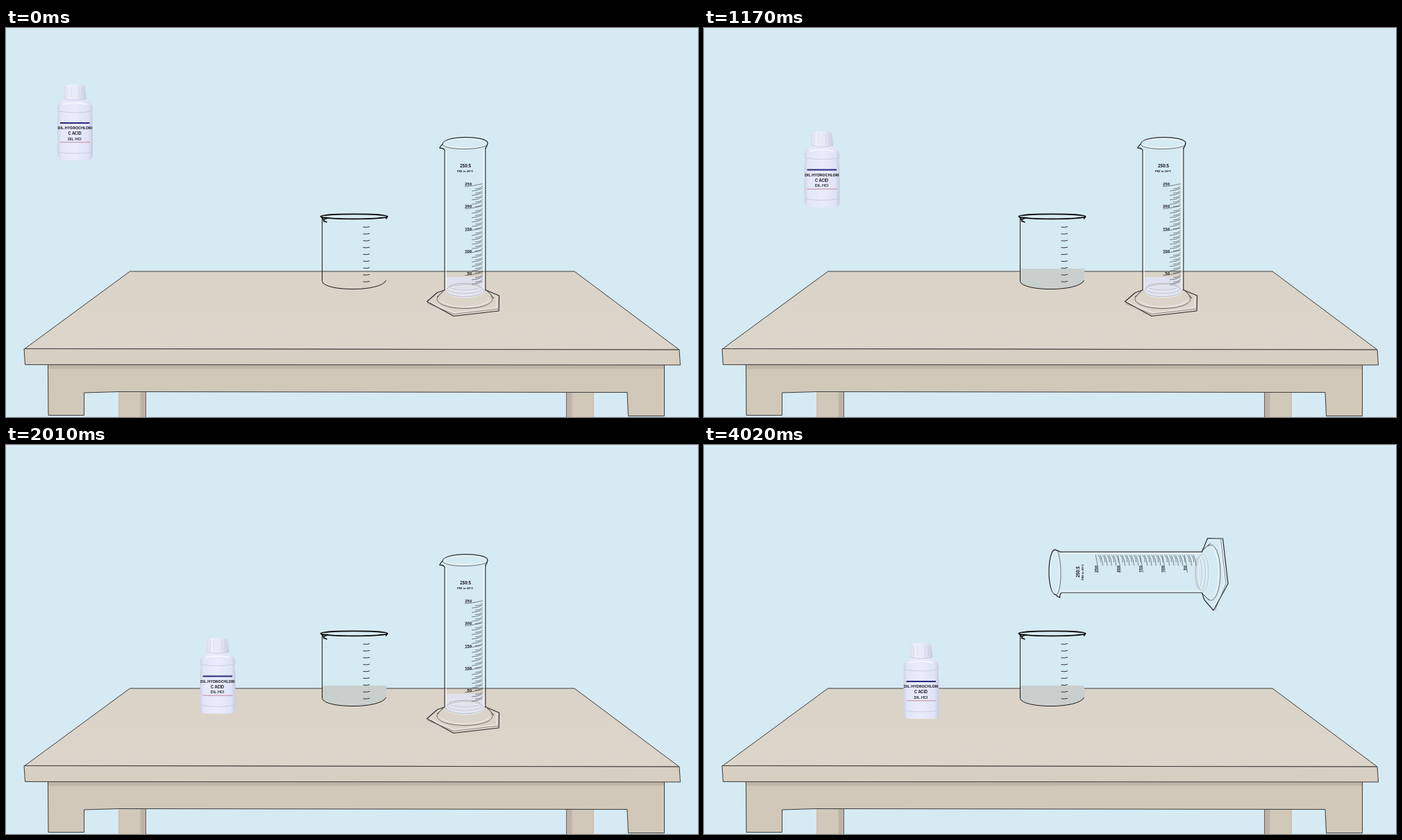
An HTML page with a canvas for the animation above (6330 ms loop, 997 by 561 pixels).

```html
<!DOCTYPE html>
<html lang="en">
<head>
<meta charset="utf-8">
<title>Acid and measuring cylinder</title>
<style>
html, body { margin: 0; width: 100%; height: 100%; overflow: hidden; background: #d6eaf3; }
canvas { display: block; width: 100%; height: 100%; }
</style>
</head>
<body>
<canvas id="stage" width="997" height="561"></canvas>
<script>
const ctx = document.getElementById('stage').getContext('2d');
const LOOP = 6330, STEP = 30;
const INK = '#3c3c3c';

const clamp = v => Math.max(0, Math.min(1, v));

function paint(path, fill, stroke, width = 1) {
  const p = typeof path === 'string' ? new Path2D(path) : path;
  if (fill) { ctx.fillStyle = fill; ctx.fill(p); }
  if (stroke) { ctx.strokeStyle = stroke; ctx.lineWidth = width; ctx.stroke(p); }
}

function oval(x, y, rx, ry, stroke, width, from = 0, to = 2 * Math.PI) {
  const p = new Path2D();
  p.ellipse(x, y, rx, ry, 0, from, to);
  paint(p, null, stroke, width);
}

function label(text, x, y, font, align = 'center', color = '#1c1c22') {
  ctx.font = font;
  ctx.textAlign = align;
  ctx.fillStyle = color;
  ctx.fillText(text, x, y);
}

function shade(x0, y0, x1, y1, ...stops) {
  const g = ctx.createLinearGradient(x0, y0, x1, y1);
  stops.forEach(([at, color]) => g.addColorStop(at, color));
  return g;
}

// Constant speed in the middle, even acceleration over fraction a at both ends.
function ramp(u, a = 0.4) {
  u = clamp(u);
  if (u < a) return u * u / (2 * a * (1 - a));
  if (u > 1 - a) return 1 - ramp(1 - u, a);
  return (u - a / 2) / (1 - a);
}

function drawTable() {
  ctx.fillStyle = '#d6eaf3';
  ctx.fillRect(0, 0, 997, 561);
  paint('M162 524H202V561H162Z', shade(162, 0, 202, 0,
    [0, '#c9beb1'], [0.08, '#d1c8ba'], [0.76, '#d1c8ba'], [0.82, '#bdb2a7'], [1, '#bdb2a7']));
  paint('M807 524H847V561H807Z', shade(807, 0, 847, 0,
    [0, '#bdb2a7'], [0.18, '#bdb2a7'], [0.24, '#d1c8ba'], [0.92, '#d1c8ba'], [1, '#c9beb1']));
  paint('M201.5 525V561M807.5 525V561', null, '#66605b');
  paint('M60.5 486L61 558.5H112.5V526L163 524.5L895 525.5L896.5 559.5H948.5V486Z', '#d1c8ba', INK);
  paint('M61 486H948V491.5H61Z', '#bfb5a8');
  paint('M178.5 351H819L970 464L27 462.5Z', shade(0, 351, 0, 463, [0, '#dad3c7'], [1, '#dcd5ca']), INK);
  paint('M26 462.5L970 464L971.5 486L27.5 485.5Z', '#d8cfc3', INK);
}

function drawBeaker(full) {
  if (full) paint('M456 347H548V365C543 379 459 379 456 365Z', '#c9cfcd');
  paint('M455.5 274V365.5C459 380 540 381 547.5 364', null, '#181818');
  ctx.lineCap = 'round';
  oval(501.5, 271.8, 48, 3.5, '#080808', 1.8);
  paint('M453.5 272C456 274 458 275 458 279M458 276L463 274M458 278L462 280M547.5 275L549.5 272.5', null, '#080808', 1.5);
  ctx.lineCap = 'butt';
  for (let i = 0; i < 9; i++) {
    const y = 287 + i * 9.85;
    paint(`M514.5 ${y}Q519 ${y + 1} 524 ${y - 0.5}`, null, '#333');
  }
}

function drawBottle(dx, dy) {
  ctx.save();
  ctx.translate(dx, dy);
  paint('M83 102L84 85Q85 81.5 99 81.5Q113 81.5 114 85L116 102Q115 105 99 105Q84 105 83 102Z',
    shade(82, 0, 116, 0, [0, '#d5d9e7'], [0.25, '#edf0fa'], [0.65, '#e5e8f6'], [1, '#c8cddd']));
  paint('M84 103C79 107 74 109 74 117L75 122L74 135V180C74 188 77 191 84 191H117C123 191 125 188 125 180V136L124 122L125 117C125 110 121 108 115 103Q99 107 84 103Z',
    shade(73, 0, 126, 0, [0, '#c9cedf'], [0.12, '#e3e6f6'], [0.5, '#e9ecfc'], [0.86, '#e0e3f5'], [1, '#c1c7db']));
  paint('M76 120Q99 124 123 120M75 179Q99 183 124 179M85 102Q99 106 114 102', null, '#c7ccdf', 0.9);
  paint('M89 86V99M94 85V100M105 85V100M110 86V99', null, 'rgba(190,196,216,.4)');
  paint('M82 110Q99 106 116 110', null, '#f8f9ff', 1.5);
  paint('M78 136H120.5V138H78Z', '#29297c');
  label('DIL.HYDROCHLORI', 99.3, 146.4, '700 5.35px Inter, sans-serif');
  label('C ACID', 99, 154.1, '700 5.6px Inter, sans-serif');
  label('DIL.HCl', 99, 161.9, '600 5.4px Inter, sans-serif');
  paint('M78 164.8H121', null, '#c3828f', 0.9);
  ctx.restore();
}

function drawScale() {
  for (let i = 0; i < 45; i++) {
    const y = 228.7 + i * 3.2;
    const x = i % 10 === 0 ? 661 : i % 2 ? 676 : 671;
    paint(`M${x} ${y}Q${x + 8} ${y - 0.2} 686.5 ${y - 4}`, null, '#4a4f52', 0.7);
  }
  for (let i = 0; i < 5; i++) {
    label(250 - i * 50, 671, 227.3 + i * 32.1, '700 5.8px "Noto Sans", sans-serif', 'right');
  }
  label('250:5', 662, 201.3, '700 6.2px "Noto Sans", sans-serif');
  label('PKE in 20°C', 661.5, 207.8, '600 4.2px "Noto Sans", sans-serif');
}

function drawCylinder(alpha, filled) {
  if (alpha <= 0) return;
  ctx.globalAlpha = alpha;
  ctx.lineJoin = 'round';
  if (filled) paint('M634.5 359H689V380C684 391 640 391 634.5 380Z', 'rgba(224,228,243,.9)');

  paint('M632 378L621.5 381.5L606.5 394.5L645 415.5L710 408L710.5 386L690 377.5', null, '#2c2c2c', 1.2);
  paint('M607 397L645 412.5L709 405', null, '#777', 0.7);
  paint('M609 394.5L646 410.5L707 403.5V388', null, 'rgba(255,255,255,.6)');
  oval(661, 391, 40, 13.5, '#555', 0.8, -0.35, Math.PI + 0.35);
  oval(661, 390, 36, 12, 'rgba(255,255,255,.65)', 1, 0.1, 2.9);
  paint('M632 377Q627 383 621 388M691 377Q697 382 703 390', null, '#333');
  [[374, 22, 5], [377, 25, 7], [380, 27, 8.5]].forEach(([y, rx, ry]) => {
    oval(661, y, rx, ry, 'rgba(255,255,255,.8)', 1);
    oval(661, y - 0.8, rx, ry, 'rgba(90,95,105,.5)', 0.6);
  });

  paint('M634 177V378M688.5 174V377', null, 'rgba(255,255,255,.8)', 1.2);
  paint('M632 176V378M690.8 173V377', null, '#3a3a3a', 1.2);
  paint('M632 176Q630 173 624.8 173Q626 170 629 167.5C631 154 693 155 694 166Q693 171 690.5 174', null, '#2c2c2c', 1.3);
  paint('M629 168C634 177 684 176 693 169', null, '#555', 0.8);
  oval(661, 166, 30.5, 6.5, 'rgba(255,255,255,.75)', 1);
  drawScale();
  ctx.globalAlpha = 1;
}

function drawTilted(alpha) {
  ctx.save();
  ctx.translate(626, 186.5);
  ctx.rotate(-Math.PI / 2);
  ctx.translate(-658.5, -286.5);
  drawCylinder(alpha, false);
  ctx.restore();
}

function render(t) {
  const slide = ramp((t - 455) / 1795);
  drawTable();
  drawBeaker(t >= 30);
  drawCylinder(1 - clamp((t - 2760) / 360), true);
  drawTilted(clamp((t - 3660) / 360));
  drawBottle(213.5 * slide, 204 * slide);
}

const start = performance.now();
function tick() {
  const t = (performance.now() - start) % LOOP;
  render(Math.floor(t / STEP) * STEP);
  requestAnimationFrame(tick);
}
tick();
</script>
</body>
</html>
```
